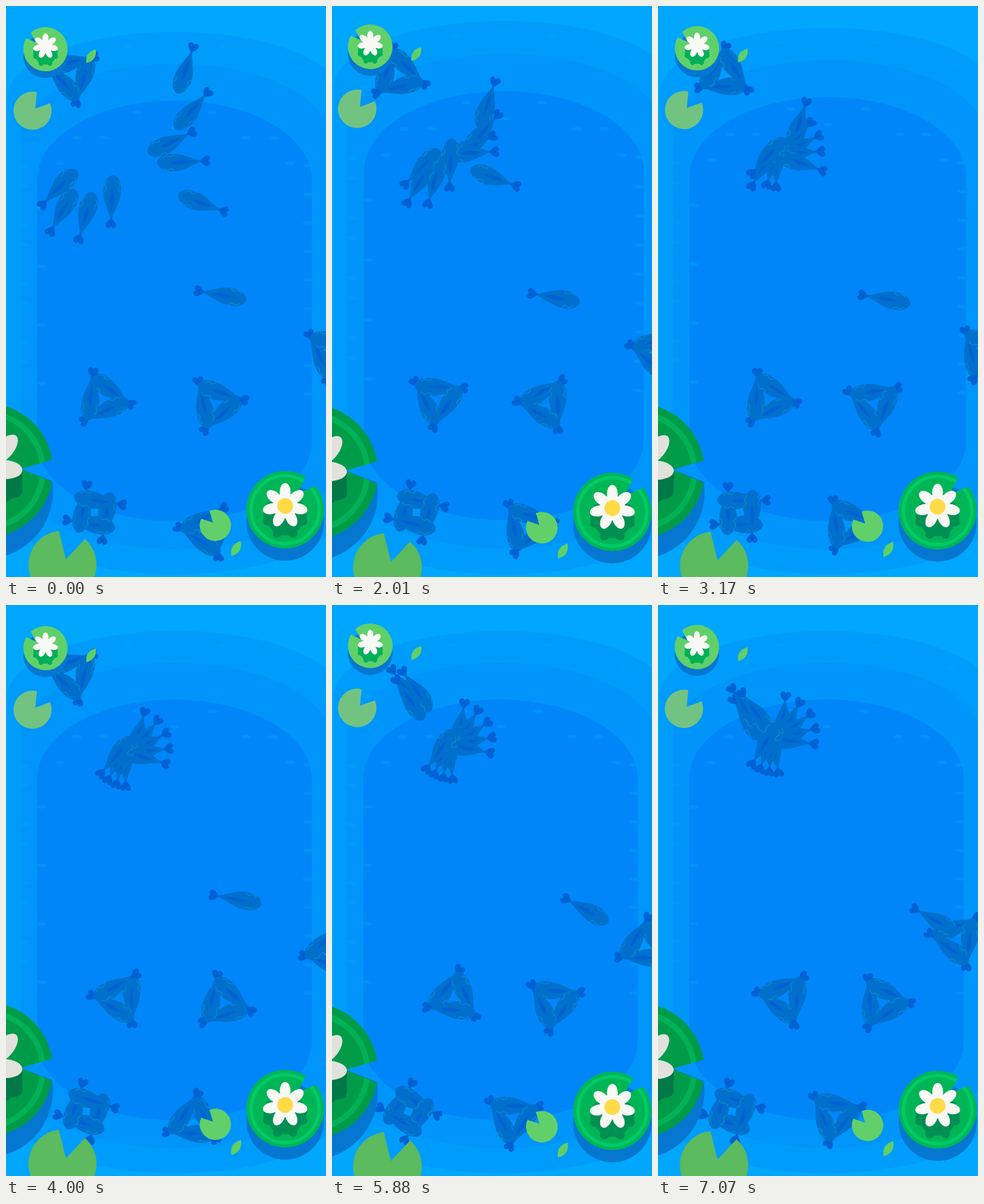
Animation of 470 by 840 pixels, one loop 7.17 s. Source, as an HTML page with a canvas:

```html
<!DOCTYPE html>
<html lang="en">
<head>
<meta charset="utf-8">
<title>Koi pond</title>
<style>
  html, body { margin: 0; width: 100%; height: 100%; overflow: hidden; background: #00a7fc; }
  canvas { display: block; width: 470px; height: 840px; }
</style>
</head>
<body>
<canvas id="stage" width="470" height="840"></canvas>
<script>
const ctx = document.getElementById('stage').getContext('2d');
const LOOP = 7170, STEP = 117.2, LAST = 60;
const RAD = Math.PI / 180;
const cos = a => Math.cos(a * RAD), sin = a => Math.sin(a * RAD);
const clamp = (v, lo = 0, hi = 1) => Math.min(hi, Math.max(lo, v));
const turn = (a, b, k) => a + (((b - a) % 360 + 540) % 360 - 180) * k;

function fill(color, path) {
  ctx.fillStyle = color;
  ctx.fill(path);
}

function ellipse(x, y, rx, ry = rx, angle = 0) {
  const p = new Path2D();
  p.ellipse(x, y, rx, ry, angle * RAD, 0, 7);
  return p;
}

function scaleAround(x, y, s, draw) {
  ctx.save();
  ctx.translate(x, y);
  ctx.scale(s, s);
  ctx.translate(-x, -y);
  draw();
  ctx.restore();
}

// ---- water ----
function basin(left, right, top, bottom, ry) {
  const cx = (left + right) / 2, rx = (right - left) / 2;
  const p = new Path2D();
  p.ellipse(cx, top + ry, rx, ry, 0, Math.PI, 2 * Math.PI);
  p.ellipse(cx, bottom - ry, rx, ry, 0, 0, Math.PI);
  p.closePath();
  return p;
}
const basins = [
  ['#009cfc', basin(2, 494, 38, 836, 97)],
  ['#0095fa', basin(22, 474, 85, 799, 107)],
  ['#0086f9', basin(46, 449, 139, 758, 116)]
];

function drawWater() {
  for (const [color, path] of basins) fill(color, path);
  const ripple = (x, y) => fill('rgba(0,166,245,.4)', ellipse(x, y, 7, 2.6, 3));
  // Staggered ripples under the upper banks
  for (let i = 0; i < 9; i++) {
    const a = 198 + i * 18;
    ripple(248 + 178 * cos(a), 255 + (i % 2 ? 104 : 76) * sin(a));
    if (i % 2) ripple(248 + 225 * cos(a), 143 + 88 * sin(a));
  }
  // Regular ripples along the side banks
  for (let i = 0; i < 11; i++) {
    if (i % 3 < 2) ripple(28, 236 + i * 28.8);
    if (i < 4) ripple(52, 297 + i * 86);
    if (i < 9) ripple(443, 235 + i * 42);
  }
}

// ---- fish ----
const BODY = new Path2D('M-29 0C-12-4-1-14 16-13C27-13 38-7 39 1C38 8 28 14 16 13C0 13-11 5-29 0Z');
const TAIL = new Path2D('M-23 0C-28-2-30-8-36-8C-41-6-40-1-36 0C-40 1-41 6-36 8C-30 8-28 2-23 0Z');
const SPINE = new Path2D('M-14 0Q3-6 18 0Q3 6-14 0Z');
const GILLS = new Path2D('M14-13C15-8 22-8 24-12M24-11q5 1 6 4M14 13C15 8 22 8 24 12M24 11q5-1 6-4');

function fish(x, y, heading) {
  ctx.save();
  ctx.translate(x, y);
  ctx.rotate(heading * RAD);
  fill('#0070cc', BODY);
  fill('#0062d2', TAIL);
  fill('#0062d2', SPINE);
  ctx.strokeStyle = '#0a8bd2';
  ctx.lineWidth = 1.2;
  ctx.stroke(GILLS);
  ctx.restore();
}

// Tails run around a ring while the heads point just past its middle
function shoal(x, y, count, phase, aim = 0, k = 0) {
  for (let i = 0; i < count; i++) {
    const a = phase + i * 360 / count, heading = a + 202;
    const spread = 1 - k / 2;
    fish(x + (47 * cos(a) + 38 * cos(heading)) * spread,
         y + (47 * sin(a) + 38 * sin(heading)) * spread,
         turn(heading, aim, k));
  }
}

// An eastern and a western arc of fish swim in and huddle
function gather(t) {
  const late = Math.max(0, t - 4.5);
  const swimIn = (angle, distance) => {
    const d = Math.max(25, distance - 31 * t);
    const a = angle - 3 * Math.max(0, t - 3);
    fish(182 - 3 * late + d * cos(a), 210 - 8 * late + d * sin(a), a + 163);
  };
  for (let i = 0; i < 5; i++) swimIn(-55 + 23 * i, 102 + 42 * cos(80 * i));
  for (let i = 0; i < 4; i++) swimIn(109 + 14 * i, 82 + 55 * sin(45 * i));
}

function drawFish(t) {
  const late = Math.max(0, t - 4.8);
  shoal(97 + 16 * late, 101 + 25 * late, 3, 84 - 91 * t, 55, clamp((t - 4.6) / 1.1));
  gather(t);
  shoal(142 + 6.3 * t, 578, 3, 13 - 76.5 * t);
  shoal(308 + 3 * t, 585, 3, 115 - 84 * t);
  shoal(130 - 3 * t, 745, 4, 77 - 88 * t);
  shoal(295 - 5 * t, 772 - 3 * t, 3, 69 - 97 * t);
  shoal(478 - 17 * late, 510 - 8 * late, 3, 102 - 72 * t);
  fish(315 + 5.5 * t + 23 * late, 425 + 1.9 * t + 11 * late, 10 + clamp((t - 4) * 10, 0, 19));
}

// ---- plants ----
const SHADOW = '#0577d0';

// Disc with a wedge cut out between two angles, meeting at (ax, ay)
function pad(x, y, r, color, from, to, ax, ay) {
  const p = new Path2D();
  p.arc(x, y, r, to * RAD, (from + 360) * RAD);
  p.lineTo(ax, ay);
  p.closePath();
  fill(color, p);
  return p;
}

function ring(clip, x, y, r, width, color) {
  ctx.save();
  ctx.clip(clip);
  ctx.strokeStyle = color;
  ctx.lineWidth = width;
  ctx.stroke(ellipse(x, y, r));
  ctx.restore();
}

function petals(x, y, r, color, core) {
  for (let i = 0; i < 7; i++) {
    const a = -90 + i * 360 / 7;
    fill(color, ellipse(x + r * .62 * cos(a), y + r * .62 * sin(a), r * .39, r * .24, a));
  }
  fill(color, ellipse(x, y, r * core));
}

function flower(x, y, r, depth, cup) {
  const sides = new Path2D();
  sides.rect(x - r * .96, y + r * .22, r * 1.92, depth);
  fill(cup, sides);
  petals(x, y + depth, r, cup, .82);
  petals(x, y, r, '#f8f8f5', .56);
}

function leaf(x1, y1, x2, y2) {
  const mx = (x1 + x2) / 2, my = (y1 + y2) / 2;
  const dx = (x2 - x1) * .45, dy = (y2 - y1) * .45;
  const p = new Path2D();
  p.moveTo(x1, y1);
  p.quadraticCurveTo(mx - dy, my + dx, x2, y2);
  p.quadraticCurveTo(mx + dy, my - dx, x1, y1);
  fill('#60cf66', p);
}

function drawPlants() {
  fill(SHADOW, ellipse(58, 73.5, 32.5));
  pad(58, 63.5, 32.5, '#60d06a', -150, -132, 44, 54);
  flower(58, 59, 18.5, 12, '#00b058');
  pad(39, 154, 28, '#72c382', -77, -23, 43, 151);
  leaf(118, 84, 132, 64);

  pad(-30, 714, 99, SHADOW, -180, -9, 22, 681);
  const left = pad(-30, 683, 99, '#009b49', -9, 10, 22, 681);
  ring(left, -30, 683, 84, 8, '#00b255');
  fill('#007847', new Path2D('M-10 684H24V714C23 726 8 722 5 727L-10 735Z'));
  fill('#e1e2dc', ellipse(-2, 652, 26, 13, -50));
  fill('#e1e2dc', ellipse(-2, 682, 26, 14, 2));
  pad(83, 822, 50, '#5cba5f', -96, -49, 88, 814);

  fill(SHADOW, ellipse(410, 759, 57));
  const right = pad(410, 741, 57, '#00b555', -58, -38, 428, 717);
  ring(right, 410, 741, 50, 5, '#00cb66');
  flower(410, 735, 33, 17, '#008f52');
  fill('#ffdb47', ellipse(410, 735.5, 11.5));
  pad(307.5, 764, 23, '#62d06a', -155, -112, 304, 760);
  leaf(331, 809, 345, 787);
}

function draw(t) {
  const swell = (1 - cos(90 * t)) / 2;
  ctx.fillStyle = '#00a7fc';
  ctx.fillRect(0, 0, 470, 840);
  scaleAround(0, 840, 1 + .02 * (t < 4 ? swell : 0), drawWater);
  drawFish(t);
  scaleAround(235, 420, 1 + .01 * swell, drawPlants);
}

const begin = performance.now();
function tick() {
  const ms = (performance.now() - begin) % LOOP;
  draw(Math.min(LAST, Math.floor(ms / STEP)) * LOOP / (LAST + 1) / 1000);
  requestAnimationFrame(tick);
}
tick();
</script>
</body>
</html>
```
